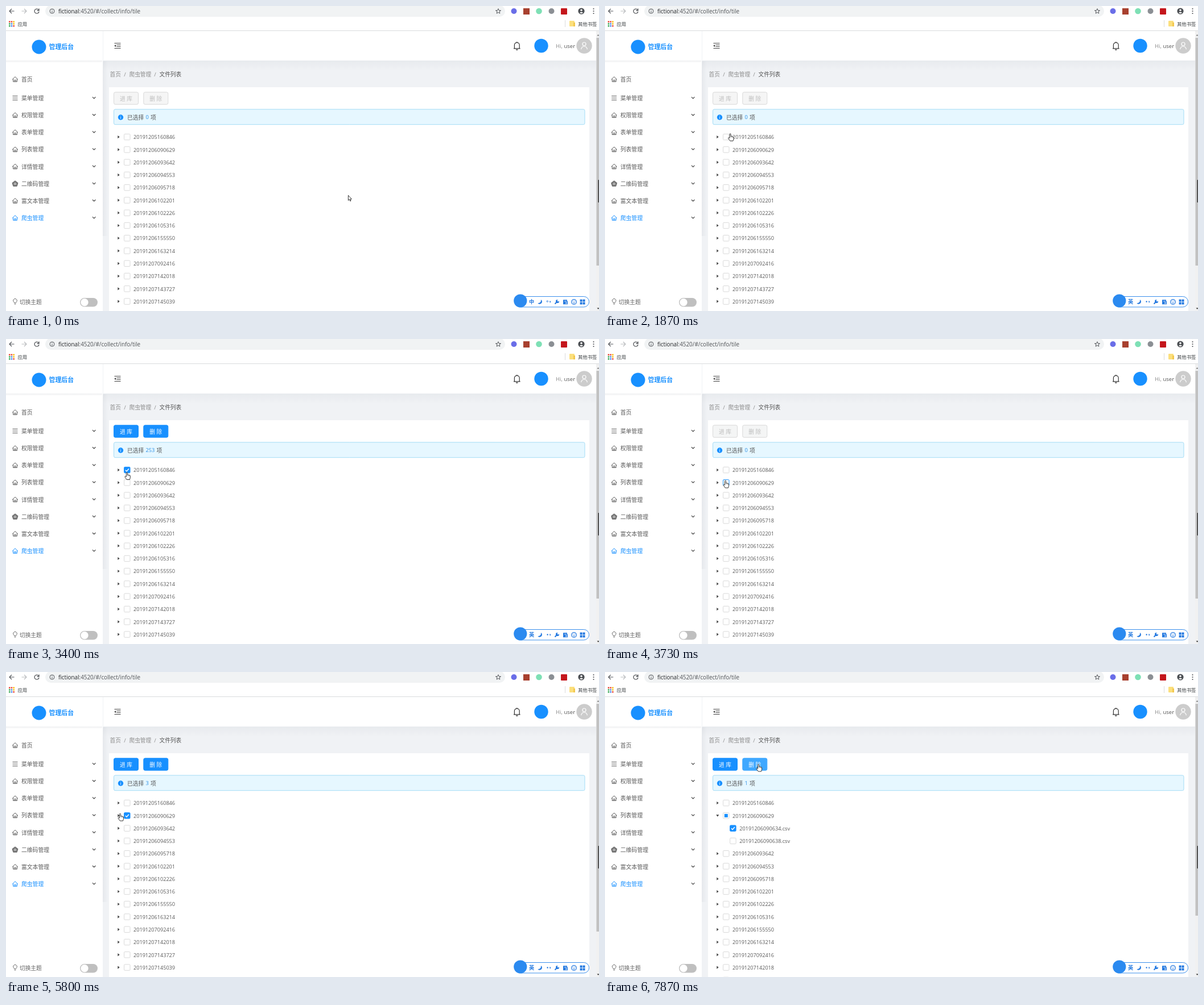
Animation of 1042 by 537 pixels, one loop 8 s. Source, as an HTML page with a canvas:

```html
<!DOCTYPE html>
<html lang="zh-CN">
<head>
<meta charset="utf-8">
<title>文件列表</title>
<style>
html, body { margin: 0; width: 100%; height: 100%; overflow: hidden; background: #fff; }
canvas { display: block; width: 1042px; height: 537px; }
</style>
</head>
<body>
<canvas id="stage" width="1042" height="537"></canvas>
<script>
const ctx = document.getElementById('stage').getContext('2d');
const LOOP = 8000, STEP = 1000 / 15;
const FONT = '"Open Sans", "Noto Sans CJK SC", "Noto Sans CJK", sans-serif';
const BLUE = '#1890ff', INK = '#5a5a5a', ROW = 22.27, TOP = 230.6;

const folders = ['20191205160846', '20191206090629', '20191206093642', '20191206094553',
  '20191206095718', '20191206102201', '20191206102226', '20191206105316', '20191206155550',
  '20191206163214', '20191207092416', '20191207142018', '20191207143727', '20191207145039'];
const files = ['20191206090634.csv', '20191206090638.csv'];
const menu = ['菜单管理', '权限管理', '表单管理', '列表管理', '详情管理', '二维码管理', '富文本管理', '爬虫管理'];

// pointer path: step, x, y
const path = [[0, 601, 333], [1, 552, 317], [3, 440, 284], [5, 384, 267], [8, 384, 267],
  [12, 395, 267], [16, 395, 267], [17, 384, 262], [21, 322, 246], [25, 246, 229], [28, 220, 225],
  [30, 220, 225], [34, 212.5, 232], [50, 212.5, 232], [56, 211.5, 249.5], [78, 211.5, 249.5],
  [80, 201.5, 249.5], [81, 201.5, 249.5], [82, 200.5, 249.5], [90, 200.5, 249.5], [94, 215, 276],
  [97, 226.5, 295], [105, 226.5, 295], [108, 258, 266], [111, 274, 212], [114, 270, 165],
  [115, 270, 164], [118, 269.5, 162.5]];

// --- timing ---
const clamp = v => Math.max(0, Math.min(1, v));
const ramp = (t, start, len = 300) => clamp((t - start) / len);
function bezier(x1, y1, x2, y2) {
  const at = (a, b, s) => 3 * a * s * (1 - s) ** 2 + 3 * b * s * s * (1 - s) + s ** 3;
  return x => {
    let lo = 0, hi = 1;
    for (let i = 0; i < 20; i++) {
      const mid = (lo + hi) / 2;
      if (at(x1, x2, mid) < x) lo = mid; else hi = mid;
    }
    return at(y1, y2, lo);
  };
}
const ease = bezier(.25, .1, .25, 1);
const inOut = bezier(.645, .045, .355, 1);
const popIn = bezier(.12, .4, .29, 1.46);

function pointer(t) {
  const n = t / STEP;
  let i = 0;
  while (i < path.length - 2 && path[i + 1][0] <= n) i++;
  const [a, ax, ay] = path[i], [b, bx, by] = path[i + 1];
  const k = clamp((n - a) / (b - a));
  return { x: ax + (bx - ax) * k, y: ay + (by - ay) * k };
}

// --- drawing helpers ---
const mix = (a, b, k) => `rgb(${a.map((v, i) => Math.round(v + (b[i] - v) * k))})`;
const WHITE_RGB = [255, 255, 255], BLUE_RGB = [24, 144, 255];

function text(s, x, y, size, color = INK, weight = 400) {
  ctx.font = `${weight} ${size}px ${FONT}`;
  ctx.fillStyle = color;
  ctx.fillText(s, x, y + size * .37);
  return ctx.measureText(s).width;
}
function rect(x, y, w, h, color) {
  ctx.fillStyle = color;
  ctx.fillRect(x, y, w, h);
}
function paint(fill, stroke, width = 1) {
  if (fill) { ctx.fillStyle = fill; ctx.fill(); }
  if (stroke) { ctx.strokeStyle = stroke; ctx.lineWidth = width; ctx.stroke(); }
}
function round(x, y, w, h, r, fill, stroke, width) {
  ctx.beginPath();
  ctx.roundRect(x, y, w, h, r);
  paint(fill, stroke, width);
}
function circle(x, y, r, fill, stroke, width) {
  ctx.beginPath();
  ctx.arc(x, y, r, 0, Math.PI * 2);
  paint(fill, stroke, width);
}
function shape(d, x, y, fill, stroke, width = 1) {
  ctx.save();
  ctx.translate(x, y);
  const p = new Path2D(d);
  if (fill) { ctx.fillStyle = fill; ctx.fill(p); }
  if (stroke) { ctx.strokeStyle = stroke; ctx.lineWidth = width; ctx.stroke(p); }
  ctx.restore();
}
function fade(x, y, w, h, dx, dy, alpha) {
  const g = ctx.createLinearGradient(x, y, x + dx, y + dy);
  g.addColorStop(0, `rgba(0,21,41,${alpha})`);
  g.addColorStop(1, 'rgba(0,21,41,0)');
  rect(x, y, w, h, g);
}

// --- browser frame ---
function browser() {
  const dark = '#55585c';
  rect(0, 0, 1042, 44, '#fff');
  shape('M4.5 0H-4M0-4L-4 0L0 4', 10, 9, null, dark, 1.2);
  shape('M-4.5 0H4M0-4L4 0L0 4', 32, 9, null, '#b9bbbe', 1.2);
  shape('M3.2-2.4A4 4 0 1 0 4 1M4-4.5V-1H.5', 54, 9, null, dark, 1.3);
  round(69, -1, 808, 20, 10, '#f1f3f4');
  circle(81, 9, 4, null, dark);
  rect(80.5, 8.5, 1, 3, dark);
  rect(80.5, 6.5, 1, 1, dark);
  const w = text('fictional', 92, 9, 9.9, '#26282b');
  text(':4520/#/collect/info/tile', 92 + w, 9, 9.9, '#505357');
  shape('M0-4.6L1.3-1.5L4.6-1.3L2-.1L2.8 3.8L0 2L-2.8 3.8L-2-.1L-4.6-1.3L-1.3-1.5Z', 865, 9.3, null, dark);
  circle(892.5, 9, 5, '#6a6ee8');
  rect(909, 4, 11, 11, '#a8402f');
  circle(936.5, 9, 5.3, '#7ee0b5');
  circle(958.5, 9, 5, '#8b8f94');
  round(975, 4, 11, 11, 1, '#c4161c');
  circle(1011, 9, 5.6, '#4b4e52');
  circle(1011, 7.3, 1.7, '#fff');
  shape('M-3 2.5Q0-.2 3 2.5Q0 4.8-3 2.5Z', 1011, 9.4, '#fff');
  for (const y of [5, 9, 13]) circle(1032.5, y, 1.1, dark);

  const dots = ['#ea4335', '#ea4335', '#fbbc05', '#34a853', '#4285f4', '#fbbc05', '#34a853', '#4285f4', '#ea4335'];
  dots.forEach((c, i) => rect(5 + i % 3 * 3.7, 26.5 + Math.floor(i / 3) * 3.7, 2.5, 2.5, c));
  text('应用', 20.5, 31.5, 8.4, '#3c4043');
  rect(982, 25, 1, 12, '#dcdcdc');
  round(990, 26, 9, 10, 1, '#fbdf7d');
  rect(997, 29, 3, 7, '#f3c94f');
  text('其他书签', 1005, 31.5, 8.4, '#3c4043');
  rect(0, 43, 1042, 1, '#d9dbdd');
}

// --- page chrome ---
const HOME = 'M-4.8.3L0-4.4L4.8.3M-3.4-.8V4.2H3.4V-.8M-1.1 4.2V1.3H1.1V4.2';
const LINES = 'M-4.5-3.5H4.5M-4.5 0H4.5M-4.5 3.5H4.5';

function sidebar() {
  rect(0, 44, 170, 493, '#fff');
  fade(170, 97, 9, 308, 9, 0, .045);
  fade(0, 96, 169, 4, 0, 4, .07);
  circle(58, 72, 12.5, BLUE);
  text('管理后台', 75.5, 71.5, 10.9, BLUE, 700);
  shape(HOME, 16, 129, null, INK);
  text('首页', 27, 129.5, 9.8);
  menu.forEach((name, i) => {
    const y = 162 + i * 30.15, color = i === 7 ? BLUE : INK;
    if (i === 5) {
      shape('M0-5L5-1.2L3.2 4.5H-3.2L-5-1.2Z', 16, y, '#777', '#555', .8);
      shape('M0-2.6V2M-2.6-.6L2.6 2M2.6-.6L-2.6 2', 16, y, null, '#e4e4e4', .7);
    } else shape(i ? HOME : LINES, 16, y, null, color);
    text(name, 27, y + .3, 9.8, color);
    shape('M-2.7-1.4L0 1.3L2.7-1.4', 154.7, y - .5, null, '#444', 1.2);
  });
  shape('M-1.5 2.5V1.4A3.3 3.3 0 1 1 1.5 1.4V2.5ZM-1.4 4.6H1.4', 16, 520.3, null, INK, .9);
  text('切换主题', 24, 521, 9.7, '#666');
  round(130, 514, 31, 15.5, 7.7, '#bfbfbf');
  circle(138, 521.7, 6.7, '#fff');
}

function header() {
  rect(171, 44, 866, 52, '#fff');
  fade(171, 96, 866, 18, 0, 18, .035);
  shape('M-5.5-4.5H5.5M-1.5-1.5H5.5M-1.5 1.5H5.5M-5.5 4.5H5.5', 196, 70, null, '#444');
  shape('M-5.8 0L-2.8-2.3V2.3Z', 196, 70, '#444');
  shape('M-5.8 4.8H5.8M-4.4 4.6V-1.2A4.4 4.4 0 0 1 4.4-1.2V4.6M0-5.6V-7.3M-1.6 6.5Q0 8 1.6 6.5', 897.8, 70, null, '#333', 1.2);
  circle(940.5, 70, 12.2, BLUE);
  text('Hi,', 966, 70.5, 9.5, '#8b8b8b');
  text('user', 980.5, 70.5, 9.5, '#555');
  circle(1016, 70, 13.7, '#ccc');
  circle(1016, 67, 3, null, '#fff', 1.2);
  shape('M-5.3 6.3A5.3 5.3 0 0 1 5.3 6.3', 1016, 70, null, '#fff', 1.2);

  text('首页', 182.5, 120, 9.7, '#8c8c8c');
  text('/', 207.3, 120, 9.5, '#8c8c8c');
  text('爬虫管理', 216.5, 120, 9.7, '#8c8c8c');
  text('/', 260.3, 120, 9.5, '#8c8c8c');
  text('文件列表', 269.5, 120, 9.7, '#555');
}

function scrollbar(open) {
  rect(1037, 44, 5, 493, '#f1f1f1');
  rect(1037.5, 56, 4.5, 401 - 28 * open, '#c1c1c1');
  shape('M-2 1.5L0-1L2 1.5Z', 1040.5, 51, '#777');
  shape('M-2-1.5L0 1L2-1.5Z', 1040.5, 533, '#444');
  round(1040.5, 306, 4, 40, 1, '#333');
}

// --- card content ---
function button(x, label, on, hover) {
  const fill = hover ? mix(BLUE_RGB, [64, 169, 255], hover) : mix([245, 245, 245], BLUE_RGB, on);
  const edge = hover ? fill : mix([217, 217, 217], BLUE_RGB, on);
  round(x + .5, 151.8, 43, 21.4, 2.5, fill, edge);
  text(label, x + 11, 163, 9.7, mix([188, 188, 188], WHITE_RGB, on), on > .5 ? 500 : 400);
}

function notice(count) {
  round(189.5, 181.9, 827.5, 26.8, 2.5, '#e6f7ff', '#a3dcf6');
  circle(201.5, 196, 4.7, BLUE);
  rect(201, 195.5, 1, 3, '#d8eeff');
  rect(201, 193.3, 1, 1, '#d8eeff');
  text('已选择', 213, 196, 9.8, '#555');
  const w = text(String(count), 245.5, 196, 9.2, '#2b8fe6');
  text('项', 245.5 + w + 3.3, 196, 9.8, '#555');
}

function checkbox(x, y, fill, mark, half, p) {
  const hover = Math.abs(p.x - x) < 6 && Math.abs(p.y - y) < 6;
  const edge = hover ? BLUE : mix([217, 217, 217], BLUE_RGB, fill);
  round(x - 5.2, y - 5.2, 10.4, 10.4, 1.3, mix(WHITE_RGB, BLUE_RGB, fill), edge);
  if (mark > 0) {
    ctx.save();
    ctx.translate(x, y);
    ctx.scale(mark, mark);
    shape('M-2.9.1L-.8 2.3L3-2.1', 0, 0, null, '#fff', 1.5);
    ctx.restore();
  }
  if (half > 0) rect(x - 3 * half, y - 3 * half, 6 * half, 6 * half, BLUE);
}

function tick(t, on, off) {
  return {
    fill: ease(ramp(t, on)) * (1 - ease(ramp(t, off))),
    mark: t < off ? popIn(ramp(t, on + 100, 200)) : 0
  };
}

function tree(t, open, p) {
  const first = tick(t, 2620, 3450), second = tick(t, 4060, 6790);
  const half = ease(ramp(t, 6790));
  folders.forEach((name, i) => {
    const y = TOP + ROW * (i + (i > 1 ? 2 * open : 0));
    ctx.save();
    ctx.translate(197.8, y);
    if (i === 1) ctx.rotate(open * Math.PI / 2);
    shape('M-1.5-2.6L1.9 0L-1.5 2.6Z', 0, 0, '#444');
    ctx.restore();
    const s = i === 0 ? first : i === 1 ? second : { fill: 0, mark: 0 };
    checkbox(212.8, y, s.fill, s.mark, i === 1 ? half : 0, p);
    text(name, 224, y + .3, 9.15);
  });
  if (!open) return;
  ctx.save();
  ctx.beginPath();
  ctx.rect(181, TOP + ROW * 1.5, 844, ROW * 2 * open);
  ctx.clip();
  files.forEach((name, i) => {
    const y = TOP + ROW * (2 + i);
    const s = i ? second : { fill: 1, mark: 1 };
    checkbox(224.9, y, s.fill, s.mark, 0, p);
    text(name, 236.3, y + .3, 9.15);
  });
  ctx.restore();
}

function inputBar(latin) {
  const c = '#2479e0';
  round(894, 511.5, 130.5, 18.5, 9.2, '#fff', '#3b8fec');
  circle(903.8, 519, 11.6, '#2b8af0');
  text(latin ? '英' : '中', 919, 521, 9.2, c, 700);
  shape('M1.5-4A4.2 4.2 0 1 1-4 2.2Q2 2.2 1.5-4Z', 938.5, 521, c);
  if (latin) circle(951.6, 520.5, 1.2, c);
  else circle(951.3, 520, 1.3, null, c, .8);
  shape('M-.8-1.5H1V.4L-.4 2.3L-.1 0H-.8Z', 956, 521, c);
  shape('M-3.5 3.5L1-1', 968, 521, null, c, 2);
  shape('M1.5-4A3 3 0 1 0 4-1.5L2.2-.4L.5-2Z', 968, 521, c);
  shape('M-4-3.5H3V-1H4V4.5H-4Z', 983, 520.8, c);
  shape('M-1.5-4.5H1.5M-2-1H2M0 1.2H3M0 3H3', 983, 520.8, null, '#fff', .8);
  circle(998, 521, 4.4, null, c, 1.2);
  circle(996.4, 519.8, .7, c);
  circle(999.6, 519.8, .7, c);
  shape('M-2.2 1Q0 3.6 2.2 1', 998, 521, null, c);
  for (const dx of [-4.4, .5]) for (const dy of [-4.4, .5]) rect(1013 + dx, 521 + dy, 4, 4, c);
}

function cursor({ x, y }) {
  const onTree = y > 222 && x < 325;
  const onButton = x > 241 && x < 286 && y > 151 && y < 173;
  if (onTree || onButton) {
    shape('M-1 1Q-1-.2 0-.2Q1.1-.2 1.1 1V4.2Q2.2 3.6 2.9 4.5Q4 4 4.5 5Q6 4.7 6 6.3V9L5 12.6H-.2L-3.2 8.4Q-3.8 7-2.8 6.7Q-2 6.5-1 7.8Z',
      x, y, '#fff', '#222', .9);
    shape('M1.1 4V6.3M2.9 4.7V6.6M4.5 5.2V6.8', x, y, null, '#444', .6);
  } else {
    shape('M.4.4V9.3L2.4 7.4L3.8 10.6L5.1 10L3.8 7H6.4Z', x, y, '#fff', '#222', .9);
  }
}

function draw(t) {
  const p = pointer(t);
  const open = inOut(ramp(t, 5810));
  const on = inOut(ramp(t, 2620)) * (1 - inOut(ramp(t, 3450))) + inOut(ramp(t, 4060));
  const count = t < 2590 ? 0 : t < 3450 ? 253 : t < 4060 ? 0 : t < 6790 ? 3 : 1;

  rect(0, 0, 1042, 537, '#f0f2f5');
  header();
  sidebar();
  rect(181, 143, 844, 394, '#fff');
  button(189, '进 库', on, 0);
  button(241.3, '删 除', on, inOut(ramp(t, 7620)));
  notice(count);
  tree(t, open, p);
  scrollbar(open);
  browser();
  inputBar(t >= 660);
  cursor(p);
}

function tickFrame(now) {
  const t = now % LOOP;
  draw(Math.floor((t + 4) / STEP) % 120 * STEP);
  requestAnimationFrame(tickFrame);
}
requestAnimationFrame(tickFrame);
</script>
</body>
</html>
```
